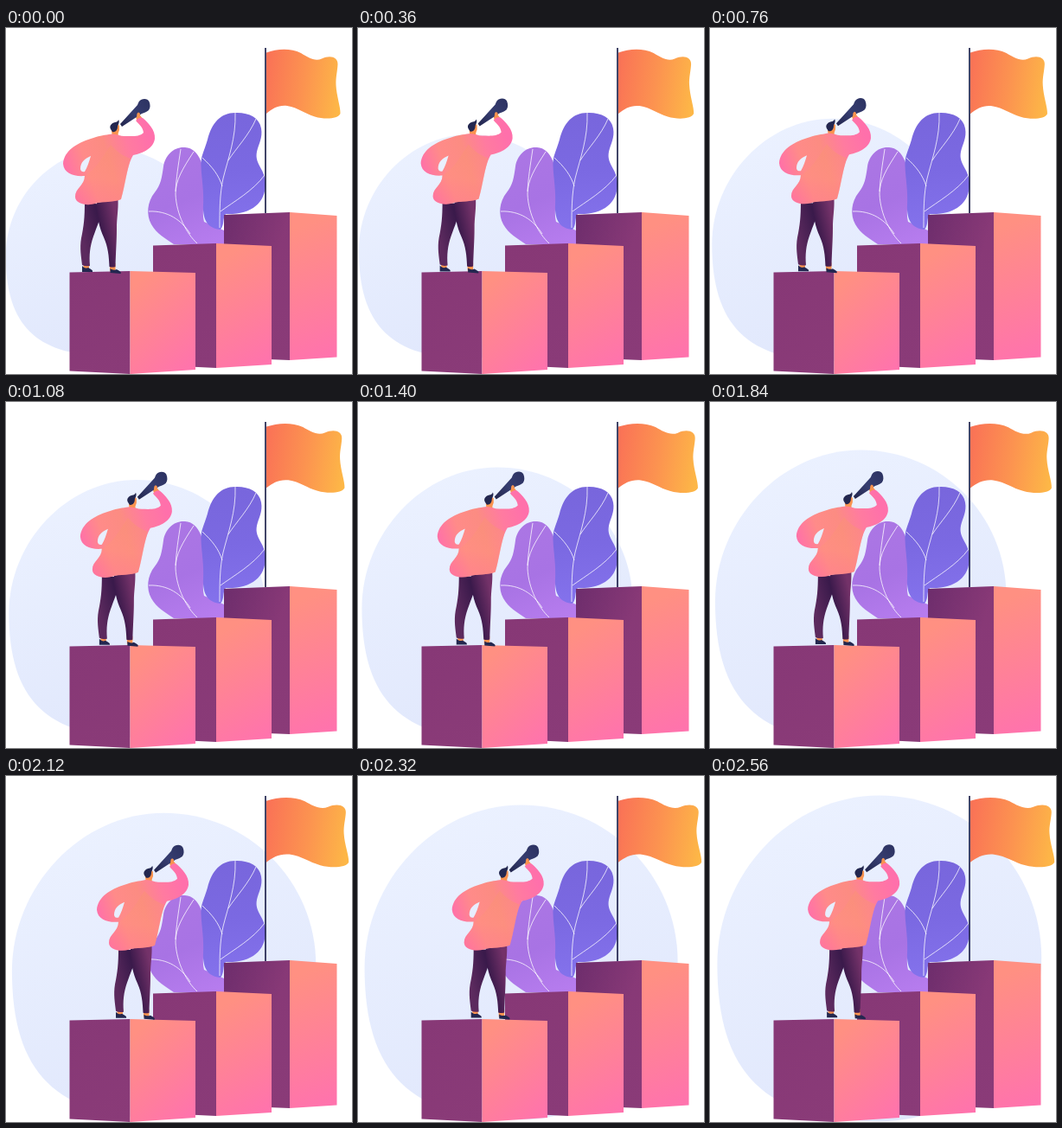
Recreate the animation shown at these times as an HTML page with a canvas. Size 400 by 400 pixels, loop 2.6 s.

```html
<!DOCTYPE html>
<html lang="en">
<head>
<meta charset="utf-8">
<style>
html, body { margin: 0; width: 100%; height: 100%; overflow: hidden; background: #fff; }
canvas { display: block; }
</style>
</head>
<body>
<canvas id="stage" width="400" height="400"></canvas>
<script>
const ctx = document.getElementById('stage').getContext('2d');
const LOOP = 2600, STEP = 40;
const NAVY = '#23274f', SKIN = '#f9934f';

function gradient(x0, y0, x1, y1, ...colors) {
  const g = ctx.createLinearGradient(x0, y0, x1, y1);
  colors.forEach((c, i) => g.addColorStop(i / (colors.length - 1), c));
  return g;
}

function shape(d, fill) {
  const path = new Path2D(d);
  return () => { ctx.fillStyle = fill; ctx.fill(path, 'evenodd'); };
}

function line(d, color, width) {
  const path = new Path2D(d);
  return () => { ctx.strokeStyle = color; ctx.lineWidth = width; ctx.stroke(path); };
}

// A box seen from its edge: left face x0..xm, right face xm..x1.
function block(x0, xm, x1, topL, topM, topR, botL, botM, botR) {
  const faces = [
    shape(`M${x0} ${topL}L${xm} ${topM}V${botM}L${x0} ${botL}Z`,
      gradient(x0, topL, xm, botM, '#873876', '#8a3b78')),
    shape(`M${xm} ${topM}L${x1} ${topR}V${botR}L${xm} ${botM}Z`,
      gradient(xm, topM + 20, x1, botR, '#ff9082', '#ff72ae'))
  ];
  return () => faces.forEach(f => f());
}

const paint = list => list.forEach(f => f());

const blocks = [
  block(252, 328, 382.5, 216, 213, 217, 381, 384, 380.5),
  block(170, 243, 307, 251.5, 249, 252, 389.5, 393, 389),
  block(73.5, 143.5, 219, 282.5, 281, 283, 396.5, 400, 395)
];
const blockShade = shape('M252 216L328 213V384L252 381Z',
  gradient(252, 232, 318, 250, 'rgba(60,24,90,.32)', 'rgba(60,24,90,0)'));

const plants = [
  shape('M207 138C194 137 184 147 182 160C180 174 179 181 172 190C163 201 162 216 168 227C174 238 184 243 194 250H252V234L229 224C226 212 230 200 230 184C230 161 224 139 207 138Z',
    gradient(190, 145, 232, 250, '#ab76e4', '#a873e4', '#b67cee')),
  line('M217 143C204 163 196 176 196 192C197 216 209 238 221 249M202 140C199 160 197 172 196 189M165 212C187 211 203 222 213 238',
    'rgba(255,255,255,.85)', 0.9),
  shape('M267 98C249 97 238 109 233 129C229 143 225 148 225.500 159C226 174 229 188 228 204C227 224 235 232 248 233C253 227 250 220 254 215C283 216 300 203 300 180C300 163 287 158 290 143C292 134 297 127 295 116C293 104 282 98 267 98Z',
    gradient(255, 98, 268, 232, '#7866dc', '#7b69e2', '#8472ec')),
  line('M265 98C266 127 257 150 251 174C247 192 247 212 247 231M289 105C281 124 266 139 257 153M227 150C238 160 246 170 250 183M299 170C286 188 263 201 248 212',
    'rgba(255,255,255,.85)', 0.9)
];

const flag = shape('M301 28.500C313 24 329 23 341 29C349 34 357 39 365 35.500C374 31 384 33 383.500 42C383 51 381 57 381.500 66C382 78 387 92 386.500 99C384 105 369 106 357 102.500C345 99 338 92 325 90C315 89 308 93 301 99Z',
  gradient(301, 60, 387, 72, '#fa7456', '#fc9350', '#fdb747'));
const pole = line('M300 23V214', '#20244d', 1.7);

const man = [
  // ankles and shoes
  shape('M89.500 271H96V279H89.500ZM120 272H126.500V281H120Z', SKIN),
  shape('M88 275C91 278 93 278 95 277C98 279 101 280 100 282H88ZM120.500 278C123 280 126 280 128 279C131 281 134 282 132.500 284L120.500 283Z', NAVY),
  // trousers
  shape('M91 202C91 219 90 229 87 243C85 255 87 264 88 274Q92 276 97 275C96 262 97 253 101 241C105 230 109 220 114 204Z',
    gradient(87, 240, 110, 234, '#5c2a5e', '#3a1a4b')),
  shape('M105 202C105 219 108 231 113 242C118 253 119 264 119.500 276Q123 277 126.500 276C127 258 128 246 128 232C128 219 130 211 129.500 198Z',
    gradient(108, 236, 130, 231, '#351748', '#743269')),
  // head
  shape('M129 111L131 113V118C130 121 129 122 130 125L123 126L122 119Z', SKIN),
  shape('M121 117C119 113 122 110 126 109C128 109 130 107 130 106C132 109 129 112 129 114C129 118 126 121 123 120Z', NAVY),
  // raised hand
  shape('M151 98C153 95 156 97 155 101L159 106L152 109L150 103Z', SKIN),
  // jumper, with the gap inside the bent arm
  shape('M119 123C126 121 131 125 137 125C146 125 154 126 159 121C158 114 154 112 150 107Q154 102 158 104C164 109 173 118 172 128C171 138 159 145 147 147C140 158 138 181 133 198C125 202 111 200 103 203C93 206 80 203 80 195C80 185 91 182 91 171C78 172 67 168 66 157C67 142 82 133 98 128C107 125 112 124 119 123ZM86 163C86 155 91 151 98 148C96 155 94 161 91 166Q87 167 86 163Z',
    gradient(68, 166, 168, 133, '#ff70a9', '#ff8b89', '#fc8c82', '#ff7ba0', '#ff70ab')),
  shape('M91 171C103 164 111 151 121 135C128 143 135 148 144 151C139 169 137 185 133 198C125 202 111 200 103 203C93 206 80 203 80 195C80 185 91 182 91 171Z',
    gradient(112, 145, 106, 203, 'rgba(250,145,118,.5)', 'rgba(255,145,124,.45)', 'rgba(255,120,140,.3)')),
  // spyglass
  shape('M132 111L152 89C153 86 154 84 156 83C160 81 164 82 165.500 85C167 89 167 92 165 95C162 97.500 160 98 157 99L134 114Z',
    gradient(133, 112, 164, 88, '#23274f', '#363d70', '#2e3464')),
  shape('M151.500 99Q153 96 155 99L154.500 103H151Z', SKIN)
];

// Growing backdrop: nearly a circle, fuller in its lower left quarter.
function backdrop(s) {
  const cx = 119 + 30 * s, cy = 258.6 - 19 * s, r = 119.3 + 26.6 * s;
  const k = 0.552, bulge = 0.71, low = 1.01, side = 0.04;
  ctx.save();
  ctx.translate(cx, cy);
  ctx.scale(r, r);
  ctx.beginPath();
  ctx.moveTo(0, -1);
  ctx.bezierCurveTo(k, -1, 1, -k, 1, 0);
  ctx.bezierCurveTo(1, k, k, low, 0, low);
  ctx.bezierCurveTo(-bulge, low, -1, bulge, -1, side);
  ctx.bezierCurveTo(-1, side - k, -k, -1, 0, -1);
  ctx.fillStyle = gradient(-0.35, -1, 0.35, 1, '#ebf1ff', '#e0e7fc');
  ctx.fill();
  ctx.restore();
}

function draw(ms) {
  const s = ms / 1000;
  ctx.clearRect(0, 0, 400, 400);
  backdrop(s);
  paint(plants);
  blocks[0]();
  blockShade();

  ctx.save();
  ctx.translate(301, 0);
  ctx.scale(1 + 0.0535 * s, 1 + 0.003 * s);
  ctx.translate(-301, 0);
  flag();
  ctx.restore();
  pole();

  blocks[1]();
  blocks[2]();

  ctx.save();
  ctx.translate(18.4 * s, -1.1 * s);
  paint(man);
  ctx.restore();
}

const start = performance.now();
function tick() {
  const ms = (performance.now() - start) % LOOP;
  draw(Math.floor(ms / STEP) * STEP);
  requestAnimationFrame(tick);
}
tick();
</script>
</body>
</html>
```
